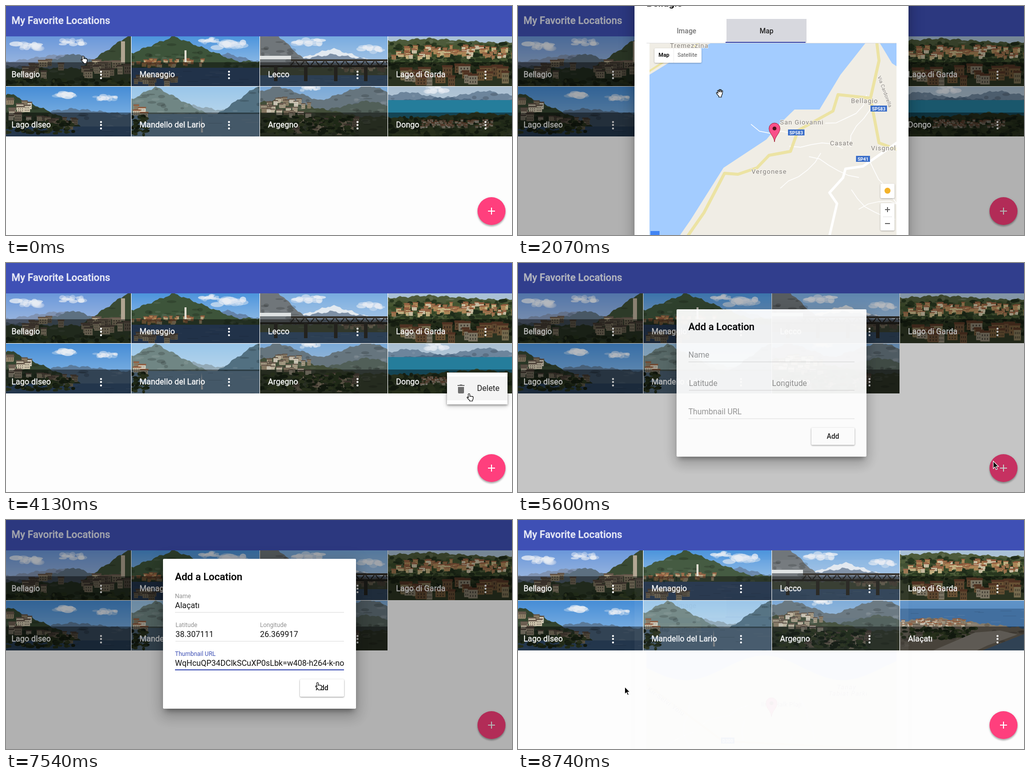
Recreate the animation shown at these times as an HTML page. Size 1012 by 460 pixels, loop 8890 ms.

```html
<!DOCTYPE html>
<html lang="en">
<head>
<meta charset="utf-8">
<title>My Favorite Locations</title>
<style>
html, body { margin: 0; width: 100%; height: 100%; overflow: hidden; background: #fdfdfd; }
#stage { position: absolute; left: 0; top: 0; width: 1012px; height: 460px; overflow: hidden; font: 16px/20px Roboto, Arial, sans-serif; color: #111; }
#stage div, #stage svg { position: absolute; white-space: nowrap; }
#stage svg { display: block; overflow: hidden; }
.head { left: 0; top: 0; width: 1012px; height: 61px; background: #3f50b5; }
.head div { left: 11px; top: 17px; font: 500 20px/24px Roboto, Arial, sans-serif; color: #e8eaf6; -webkit-text-stroke: .35px; }
.tile { height: 100px; overflow: hidden; color: #fff; }
.band { left: 0; right: 0; bottom: 0; height: 48px; background: rgba(0,0,0,.45); }
.name { left: 16px; top: 66.5px; -webkit-text-stroke: .3px; }
.dot { left: 193px; width: 4px; height: 4px; border-radius: 50%; background: #fff; }
.fab { left: 943px; top: 384px; width: 56px; height: 56px; border-radius: 50%; background: #ff3f7d; box-shadow: 0 3px 3px rgba(0,0,0,.24), 0 1px 5px rgba(0,0,0,.14); }
#shade { left: 0; top: 0; width: 1012px; height: 460px; background: #000; }
.card { background: #fff; border-radius: 2px; box-shadow: 0 16px 24px 2px rgba(0,0,0,.14), 0 6px 30px 5px rgba(0,0,0,.12), 0 8px 10px -5px rgba(0,0,0,.4); }
.title { left: 24px; top: 24px; font: 500 20px/24px Roboto, Arial, sans-serif; color: #000; -webkit-text-stroke: .2px; }
.tab { top: 68px; width: 160px; height: 48px; text-align: center; font: 500 14px/48px Roboto, Arial, sans-serif; color: #757575; }
.tab.on { color: #222; background: #ecebf6; }
#tabMap.on { background: #d7d8de; }
.ink { top: 114px; width: 160px; height: 2px; background: #3c4bb0; }
.rule { left: 24px; right: 24px; top: 116px; height: 1px; background: #dedede; }
.pane { left: 24px; top: 117px; overflow: hidden; }
.ctl { background: #fff; border-radius: 2px; box-shadow: 0 1px 3px rgba(0,0,0,.3); font-size: 11px; }
#add { left: 314px; top: 78px; width: 386px; height: 301px; }
.field { height: 48px; overflow: hidden; }
.lab { left: 0; top: 19.5px; color: #929292; }
.up .lab { top: 1px; font-size: 12px; }
.val { left: 0; top: 19.5px; }
.line { left: 0; right: 0; top: 43px; height: 1px; background: #dcdcdc; }
.focus .lab { color: #3f51b5; }
.focus .line { top: 42px; height: 2px; background: #3f51b5; }
.btn { left: 274px; top: 242px; width: 88px; height: 35px; border-radius: 2px; background: #fff; box-shadow: 0 1px 3px rgba(0,0,0,.45); text-align: center; font: 500 14px/35px Roboto, Arial, sans-serif; }
#menu { left: 882px; top: 220px; width: 121px; height: 64px; background: #fff; box-shadow: 0 2px 4px rgba(0,0,0,.35), 0 3px 10px rgba(0,0,0,.2); }
</style>
</head>
<body>
<div id="stage"></div>
<script>
const LOOP = 8890, BEAT = 147.8;
const stage = document.getElementById('stage');
const $ = id => document.getElementById(id);
const clamp = k => Math.max(0, Math.min(1, k));
const range = n => [...Array(n).keys()];

// picture helpers
const seeded = s => () => (s = (s * 16807) % 2147483647) / 2147483647;
const rect = (c, x, y, w, h) => `<rect fill="${c}" x="${x}" y="${y}" width="${w}" height="${h}"/>`;
const poly = (c, pts) => `<polygon fill="${c}" points="${pts}"/>`;
const line = (c, w, pts) => `<polyline fill="none" stroke="${c}" stroke-width="${w}" stroke-linejoin="round" points="${pts}"/>`;
const oval = (c, x, y, rx, ry) => `<ellipse fill="${c}" cx="${x}" cy="${y}" rx="${rx}" ry="${ry}"/>`;

function scatter(n, seed, draw) {
  const r = seeded(seed * 7919);
  r();
  return range(n).map(() => draw(r)).join('');
}
// small puffs gathered into a loose cloud
const cloud = (x, y, s) => scatter(14, x + y, r =>
  oval(`rgba(232,237,244,${.3 + r() * .5})`, x + (r() + r() - 1) * s * 2, y + (r() - .5) * s * .7, s * (.3 + r() * .5), s * (.15 + r() * .25)));

// mountain line: the highest of some peaks [x, height, half width], roughened
function ridge(color, base, peaks, grain = 40) {
  const top = x => base - Math.max(0, ...peaks.map(([px, h, w]) => h * (1 - Math.abs(x - px) / w))) +
    1.6 * Math.sin(x * .21 + base) + Math.sin(x * .53 + base * 2);
  const pts = range(104).map(i => `${i * 4},${top(i * 4)}`).join(' ');
  return poly(color, `0,260 ${pts} 412,260`) + scatter(grain, base, r => {
    const x = r() * 408, y = top(x) + 3 + r() * 45;
    return oval(r() < .6 ? 'rgba(0,0,0,.16)' : 'rgba(255,255,255,.08)', x, y, 3 + r() * 7, 1 + r() * 3);
  });
}
// houses, back rows first
function town(seed, x, y, w, h, size, walls, roof) {
  const n = Math.ceil(w * (h + size) / (size * size) * .8);
  let row = 0;
  return scatter(n, seed, r => {
    const hx = x + r() * w, hy = y + h * row++ / n, hw = size * (.6 + r() * .7), hh = size * (.6 + r() * .5);
    return rect(walls[Math.floor(r() * walls.length)], hx, hy, hw, hh) + rect(roof, hx - 1, hy - size * .18, hw + 2, size * .22) +
      range(6).map(i => rect('rgba(40,36,32,.65)', hx + hw * (.17 + i % 3 * .27), hy + hh * (i < 3 ? .22 : .62), hw * .1, hh * .2)).join('');
  });
}
const trees = (seed, x, y, w, h, size = 5) => scatter(Math.ceil(w * h / size / 8), seed, r =>
  oval(['#28371f', '#394a2a', '#1f2c1a', '#465531'][Math.floor(r() * 4)], x + r() * w, y + r() * h, size * (.5 + r()), size * (.4 + r() * .4)));
const water = (c, y) => rect(c, 0, y, 412, 200) + scatter(40, y, r =>
  rect(r() < .5 ? 'rgba(0,0,0,.12)' : 'rgba(255,255,255,.1)', r() * 400, y + 3 + r() * r() * 80, 8 + r() * 22, 1));

const beige = ['#a4977c', '#8f836d', '#b8ab8e', '#776d5d'];
const cream = ['#cfc5ad', '#b0a48c', '#ddd6c4', '#94856c'];
const warm = ['#d6c28e', '#dfd3b4', '#bd935f', '#a97f55'];
const slate = '#64564a', brick = '#8f5a3d';

// scenes are 256 units wide: sky colours, then layers from back to front
const scenes = {
  bellagio: ['#6a97da', '#c3d1e4', () => cloud(55, 18, 18) + cloud(140, 12, 14) + ridge('#8093b2', 54, [[110, 18, 120]]) + ridge('#5d7080', 60, [[140, 26, 80]]) +
    ridge('#3a4a33', 64, [[250, 66, 95]]) + town(5, 36, 48, 205, 24, 16, beige, slate) + rect('#b0a591', 235, 10, 8, 45) + trees(8, 0, 86, 256, 14)],
  menaggio: ['#4c94dc', '#c9dcee', () => cloud(205, 18, 20) + cloud(150, 8, 12) + ridge('#6483a8', 58, [[190, 24, 90]]) + ridge('#3d543a', 50, [[85, 50, 125]], 90) +
    water('#3c5a84', 63) + town(12, 0, 45, 140, 12, 7, ['#c4965f', '#c9b48b', '#a8764d'], brick) + rect('#e0dccf', 106, 28, 4, 24) + town(4, 0, 76, 85, 14, 12, beige, slate)],
  lecco: ['#78abe0', '#d0deea', () => cloud(100, 12, 18) + cloud(220, 26, 14) + ridge('#e2e9f0', 48, [[145, 24, 75]], 0) + ridge('#7e90a6', 50, [[145, 14, 95]]) +
    ridge('#70767a', 56, [[18, 75, 80]], 90) + ridge('#59644e', 62, []) + town(9, 150, 58, 100, 8, 7, beige, slate) + water('#4f7399', 78) +
    rect('#35322d', 62, 46, 200, 4) + rect('#35322d', 0, 58, 256, 4) + range(20).map(i => line('#35322d', 2, `${60 + i * 10},${i % 2 ? 48 : 60} ${70 + i * 10},${i % 2 ? 60 : 48}`)).join('') +
    range(4).map(i => rect('#403e37', 28 + i * 60, 60, 7, 30)).join('') + rect('#dfe2e2', 0, 39, 62, 7)],
  garda: ['#a9c1d6', '#bfcad0', () => ridge('#4d5a3a', 12, [[80, 8, 120]], 90) + trees(6, 0, 14, 256, 70, 6) + town(21, 0, 18, 250, 22, 9, warm, brick) +
    trees(33, 0, 46, 256, 20) + town(7, 0, 58, 250, 26, 20, warm, brick)],
  iseo: ['#468dd6', '#a3c8ea', () => cloud(120, 16, 14) + cloud(205, 22, 12) + ridge('#5b7a99', 58, [[140, 14, 130]]) + ridge('#33442f', 88, [[10, 75, 165]], 90) +
    water('#40628a', 80) + town(14, 0, 24, 55, 40, 13, cream, slate) + town(28, 55, 60, 85, 16, 11, beige, slate) + trees(9, 0, 68, 140, 26)],
  mandello: ['#99c6ea', '#d3e3ec', () => ridge('#92a9b6', 54, [[100, 20, 120]]) + ridge('#708684', 56, [[48, 56, 105]], 80) + ridge('#527081', 56, [[256, 60, 85]], 60) +
    water('#7c9fbc', 55) + town(5, 0, 38, 20, 20, 13, cream, brick) + trees(3, 0, 58, 30, 40) + poly('#e4e8ea', '139,92 140,58 143,92')],
  argegno: ['#7aa9d8', '#c0ceda', () => cloud(100, 4, 10) + ridge('#66757e', 30, [[35, 32, 90], [215, 34, 100]], 60) + ridge('#515f58', 62, [[215, 34, 150]], 60) +
    ridge('#434e39', 60, [[30, 34, 170]], 90) + town(10, 0, 22, 95, 34, 10, cream, slate) + town(18, 60, 60, 130, 28, 11, beige, slate) + trees(17, 0, 60, 190, 36)],
  dongo: ['#a9bfd2', '#d5dfe6', () => cloud(90, 6, 14) + ridge('#6d859c', 24, [[40, 14, 70], [195, 16, 90]]) + ridge('#4e6a84', 28, [[110, 6, 90]]) +
    rect('#257d9b', 0, 27, 256, 40) + ridge('#3d4c2e', 62, [[180, 10, 120]], 90) + trees(11, 0, 62, 256, 38, 6) + town(23, 60, 66, 150, 14, 5, cream, brick)],
  alacati: ['#5f93c8', '#4a7eb5', () => water('#426f9f', 16) + ridge('#837a6b', 56, [[70, 22, 180]], 90) + town(19, 0, 36, 140, 14, 6, cream, brick) + trees(31, 0, 54, 150, 22) +
    poly('#aaa498', '20,120 150,64 200,60 235,68 175,90 90,130') + poly('#587899', '90,130 256,64 256,200 60,200')],
  villa: ['#5b7fd0', '#a7bfe6', () => cloud(128, 44, 20) + cloud(42, 56, 12) + ridge('#6f88b4', 105, [[70, 42, 130]]) + ridge('#4e6782', 106, [[60, 24, 70], [140, 26, 80]]) +
    ridge('#2f4226', 104, [[250, 96, 135]], 140) + water('#34557f', 108) + town(13, 40, 80, 205, 14, 13, ['#c7b68e', '#b6a684', '#b08a5e'], brick) +
    rect('#aaa28e', 194, 54, 7, 30) + trees(43, 15, 102, 240, 8) + oval('#343b30', 204, 105, 15, 8) + poly('#eae4d2', '20,130 76,126 68,134 26,136')]
};
function photo(key, w, h) {
  const [a, b, draw] = scenes[key], id = `${key}${h}`;
  return `<svg width="${w}" height="${h}" viewBox="0 0 256 ${256 * h / w}"><defs><linearGradient id="${id}" x2="0" y2="1"><stop stop-color="${a}"/><stop offset=".6" stop-color="${b}"/></linearGradient></defs>
    ${rect(`url(#${id})`, 0, 0, 256, 180)}${draw()}</svg>`;
}

// maps
const gold = '#ece3a3', land = '#f0ede5', sea = '#a3ccff';
const label = (x, y, s, extra = '') => `<text x="${x}" y="${y}" font-size="13" letter-spacing="1" fill="#85807b" stroke="#f6f4ef" stroke-width="2" paint-order="stroke" ${extra}>${s}</text>`;
const badge = (x, y, w, s) => rect('#3c6fc9', x, y, w, 12) + `<text x="${x + w / 2}" y="${y + 9.5}" font-size="9" font-weight="700" fill="#fff" text-anchor="middle">${s}</text>`;
const pin = (x, y) => `<path transform="translate(${x} ${y})" d="M0 0C-1-12-11-17-11-27a11 11 0 0 1 22 0C11-17 1-12 0 0Z" fill="#f9508a" stroke="#a5273c"/>` + oval('#4a1019', x, y - 27, 3.8, 3.8);
// wandering side streets
const streets = (seed, x, y, w, h) => scatter(9, seed, r => {
  let px = x + r() * w, py = y + r() * h, a = r() * 6;
  return line('#fff', 1.5, range(6).map(() => {
    a += r() - .5;
    px += 22 * Math.cos(a);
    py += 22 * Math.sin(a);
    return `${px},${py}`;
  }).join(' '));
});
const lakeMap = rect(sea, 100, -60, 800, 660) +
  poly(land, '255,560 345,430 411,325 497,268 520,240 553,208 603,208 645,138 700,68 780,-40 900,-40 900,600') +
  poly(sea, '718,40 724,75 748,115 800,150 800,40') + poly(land, '100,-60 410,-60 385,75 300,115 263,138 100,190') +
  streets(5, 580, 240, 140, 180) + line(gold, 4, '255,136 310,100 345,90 372,62') +
  line(gold, 6, '320,490 372,415 413,336 440,338 478,325 502,300 545,292 560,250 630,211 640,178 705,185 722,110 716,60') + line(gold, 6, '705,185 722,275 790,300') +
  line('#fff', 5, '790,252 690,322 655,327 650,345 623,375 638,397 614,500') +
  label(304, 84, 'Tremezzina') + label(666, 195, 'Bellagio') + label(524, 238, 'San Giovanni') + label(624, 280, 'Casate') + label(706, 290, 'Visgnola') + label(467, 337, 'Vergonese') +
  label(0, 0, 'Via Cardorella', 'style="font-size:10px;letter-spacing:.3px" transform="translate(719 142) rotate(70)"') +
  badge(705, 200, 33, 'SP583') + badge(540, 248, 33, 'SP583') + badge(676, 301, 28, 'SP41') + pin(513, 273);
const coastMap = rect(sea, 257, 75, 500, 400) + poly(land, `257,480 ${range(26).map(i => `${257 + i * 20},${175 + 25 * Math.sin(i * .4)}`).join(' ')} 757,480`) +
  streets(8, 300, 280, 400, 150) + line(gold, 4, '257,208 330,262 410,322 757,340') +
  label(638, 218, 'Tanay', 'font-style="italic"') + label(621, 231, 'Tabiat Parkı', 'font-style="italic"') + label(0, 0, 'Kır-Selvi Yolu', 'transform="translate(258 220) rotate(36)"') +
  label(486, 253, 'Ilıca Halk Plajı', 'style="letter-spacing:0"') + badge(406, 315, 27, 'D300') + pin(507, 273);

const box = (x, y, w, h, c, body = '', cls = '') => `<div class="${cls}" style="left:${x}px;top:${y}px;width:${w}px;height:${h}px;background:${c}">${body}</div>`;
const ctl = (x, y, w, h, body) => box(x, y, w, h, '#fff', body, 'ctl');
const mapPane = (id, body) => `<svg id="${id}" width="500" height="396" viewBox="257 75 500 396" font-family="Roboto, Arial, sans-serif"><g>${body}</g></svg>`;
const controls = ctl(16, 10, 94, 29, '<div style="left:8px;top:4px;font-weight:700">Map</div><div style="left:46px;top:4px;color:#555">Satellite</div>' + box(38, 0, 1, 29, '#eee')) +
  ctl(468, 282, 28, 29, '<div style="left:8px;top:8px;width:12px;height:12px;border-radius:50%;background:#f3b229"></div>') +
  ctl(468, 321, 28, 55, box(9, 12, 10, 2, '#666') + box(13, 8, 2, 10, '#666') + box(5, 27, 18, 1, '#e4e4e4') + box(9, 40, 10, 2, '#666')) +
  box(8, 377, 18, 18, '#4285f4');

// page
const tileX = col => Math.round(col * 256.3 - 5);
const tile = (i, key, name) => {
  const col = i % 4, x = tileX(col), w = tileX(col + 1) - x - 1;
  return `<div class="tile" id="${key}" style="left:${x}px;top:${61 + 101 * (i > 3)}px;width:${w}px">${photo(key, 256, 100)}<div class="band"></div><div class="name">${name}</div>
    ${range(3).map(k => `<div class="dot" style="top:${68.5 + k * 6.5}px"></div>`).join('')}</div>`;
};
const tiles = [['bellagio', 'Bellagio'], ['menaggio', 'Menaggio'], ['lecco', 'Lecco'], ['garda', 'Lago di Garda'], ['iseo', 'Lago dIseo'], ['mandello', 'Mandello del Lario'], ['argegno', 'Argegno'], ['dongo', 'Dongo']];
const fields = [
  { x: 24, y: 64, w: 338, label: 'Name', start: 41, text: 'Alaçatı' },
  { x: 25, y: 122, w: 169, label: 'Latitude', start: 44, text: '38.307111' },
  { x: 194, y: 122, w: 168, label: 'Longitude', start: 47, text: '26.369917' },
  { x: 24, y: 180, w: 338, label: 'Thumbnail URL', start: 49, text: 'WqHcuQP34DClkSCuXP0sLbk=w408-h264-k-no' }
];
const shapes = {
  hand: 'M5 1.5c1 0 1.6.7 1.6 1.6V7l.9-.6 1.6.5.9-.3 1.4.7.9-.2c.9.2 1.2.9 1.2 2l-.3 3.2-1.2 2.2v1.7H6.2v-1.4L3 11.8 1.2 9.4c-.3-1 .8-1.6 1.7-.9l1 1L3.4 3c0-.9.6-1.5 1.6-1.5Z',
  grab: 'M4 9L3 4.5c0-1.2 1.7-1.5 2-.3L6 7V2.5c0-1.3 2-1.3 2 0V7l.7-4.3c.2-1.2 2-1 1.9.3l-.2 4.5 1.2-3c.5-1 2-.5 1.8.6L12.5 11l-1.6 3.5V17H5.5v-2L2 11.2.8 8.8c-.2-1 1-1.5 1.8-.8Z',
  arrow: 'M1.5 1v15l3.4-3.2 2.3 5.2 2.5-1.1-2.3-5.1h4.7Z'
};

stage.innerHTML = `
  <div class="head"><div>My Favorite Locations</div></div>
  ${tiles.map(([key, name], i) => tile(i, key, name)).join('')}${tile(7, 'alacati', 'Alaçatı')}
  <div class="fab">${box(21, 27, 14, 2, '#fff')}${box(27, 21, 2, 14, '#fff')}</div>
  <div id="menu"><div id="hover" style="left:0;top:8px;width:121px;height:48px;background:#f4f4f4"></div>
    <svg style="left:20px;top:23px" width="16" height="20"><path fill="#6e6e6e" d="M2 6h12v11a2 2 0 0 1-2 2H4a2 2 0 0 1-2-2ZM1 2h4l1-1h4l1 1h4v2H1Z"/></svg>
    <div style="left:60px;top:21.5px;color:#212121">Delete</div></div>
  <div id="shade"></div>
  <div class="card" id="view"><div class="title" id="name"></div>
    <div class="tab" id="tabImage" style="left:24px">Image</div><div class="tab" id="tabMap" style="left:184px">Map</div>
    <div class="rule"></div><div class="ink" id="ink"></div>
    <div class="pane" id="pics" style="width:408px;height:264px"><div id="picA">${photo('villa', 408, 246)}</div><div id="picB">${photo('alacati', 408, 264)}</div></div>
    <div class="pane" id="maps" style="width:500px;height:396px">${mapPane('mapA', lakeMap)}${mapPane('mapB', coastMap)}<div id="edge" style="width:6px;height:396px;background:#fff"></div>${controls}</div></div>
  <div class="card" id="add"><div class="title">Add a Location</div>
    ${fields.map((f, i) => `<div id="field${i}" style="left:${f.x}px;top:${f.y}px;width:${f.w}px"><div class="lab">${f.label}</div><div class="val"></div><div class="line"></div></div>`).join('')}
    <div class="btn">Add</div></div>
  <svg id="cursor" width="16" height="19"><path stroke-width="1.1"/></svg>`;

// stops of the pointer, times in beats
const stops = [
  { from: 0, to: 0, x: 149, y: 99 },
  { from: 5, to: 9, x: 496, y: 130 },
  { from: 11, to: 14, x: 396, y: 166, kind: 'grab' },
  { from: 18, to: 21, x: 432, y: 188, kind: 'grab' },
  { from: 22, to: 23, x: 951, y: 236 },
  { from: 26, to: 28, x: 921, y: 261 },
  { from: 31, to: 35, x: 949, y: 397 },
  { from: 38, to: 40, x: 480, y: 162, kind: 'arrow' },
  { from: 49, to: 51, x: 618, y: 325 },
  { from: 51, to: 52, x: 850, y: 190 },
  { from: 55, to: 56, x: 500, y: 110 },
  { from: 56, to: 58, x: 212, y: 334, kind: 'arrow' }
];
const typing = b => b > 40 && b < 50;
const show = (id, on) => { $(id).style.display = on ? 'block' : 'none'; };

// dialogs rise and settle on opening; leave is how far one has sunk away again
function pose(id, b, from, to, leave = 0) {
  const open = b >= from && b < to, rest = 1 - clamp((b - from + 1) / 4), s = $(id).style;
  show(id, open);
  s.opacity = (1 - rest ** 4) * (1 - .96 * leave);
  s.transform = `translateY(${100 * rest ** 3 + 122 * leave ** 2}px) scale(${1 - .128 * rest ** 3})`;
  return open ? .3 * (1 - rest ** 2) * (1 - leave) : 0;
}

function drawView(b) {
  const second = b >= 52, start = second ? 56 : 11, settled = b >= (second ? 57 : 13), map = b >= start;
  const picH = second ? 264 : 246, s = $('view').style;
  s.left = (map ? 233 : 279) + 'px';
  s.width = (map ? 548 : 456) + 'px';
  s.height = 145 + (map ? 396 : picH) + 'px';
  s.top = 228.5 - (145 + (settled ? 396 : picH)) / 2 + 'px';
  $('name').textContent = second ? 'Alaçatı' : 'Bellagio';
  $('tabImage').classList.toggle('on', !map);
  $('tabMap').classList.toggle('on', map);
  $('ink').style.left = (map ? 182 : 24) + 'px';
  show('pics', !map);
  show('maps', map);
  for (const id of ['picA', 'mapA', 'edge']) show(id, !second);
  for (const id of ['picB', 'mapB']) show(id, second);
  const pan = clamp((b - 18) / 3);
  $('mapA').firstChild.setAttribute('transform', `translate(${36 * pan} ${22 * pan})`);
}

function drawFields(b) {
  fields.forEach((f, i) => {
    const end = i < 3 ? fields[i + 1].start : 52, el = $('field' + i), val = el.children[1];
    val.textContent = f.text.slice(0, Math.ceil(f.text.length * clamp((b - f.start + 1) / 2)));
    val.style.left = Math.min(0, f.w - val.offsetWidth) + 'px';
    el.className = 'field' + (b >= f.start ? ' up' : '') + (b >= f.start && b < end ? ' focus' : '');
  });
}

function drawCursor(b) {
  const i = stops.findLastIndex(s => s.from <= b), to = stops[i], from = stops[Math.max(0, i - 1)];
  const k = to.to > to.from ? clamp((b - to.from) / (to.to - to.from)) : 1, ease = k * k * (3 - 2 * k);
  const kind = to.kind || 'hand', dark = kind === 'arrow', path = $('cursor').firstChild;
  show('cursor', !typing(b));
  $('cursor').style.transform = `translate(${from.x + (to.x - from.x) * ease}px, ${from.y + (to.y - from.y) * ease}px)`;
  path.setAttribute('d', shapes[kind]);
  path.setAttribute('fill', dark ? '#000' : '#fff');
  path.setAttribute('stroke', dark ? '#fff' : '#000');
}

function draw(t) {
  const b = Math.floor((t + 20) / BEAT), again = b >= 52;
  const viewShade = again ? pose('view', b, 53, 99, clamp((b - 57) / 2)) : pose('view', b, 1, 23);
  $('shade').style.opacity = Math.max(viewShade, pose('add', b, 37, 52));
  drawView(b);
  drawFields(b);
  drawCursor(b);
  $('menu').style.opacity = clamp(Math.min(b - 25, 32 - b) / 2);
  show('hover', b >= 28);
  show('dongo', b < 32);
  show('alacati', again);
}

const start = performance.now();
function tick() {
  draw((performance.now() - start) % LOOP);
  requestAnimationFrame(tick);
}
tick();
</script>
</body>
</html>
```
